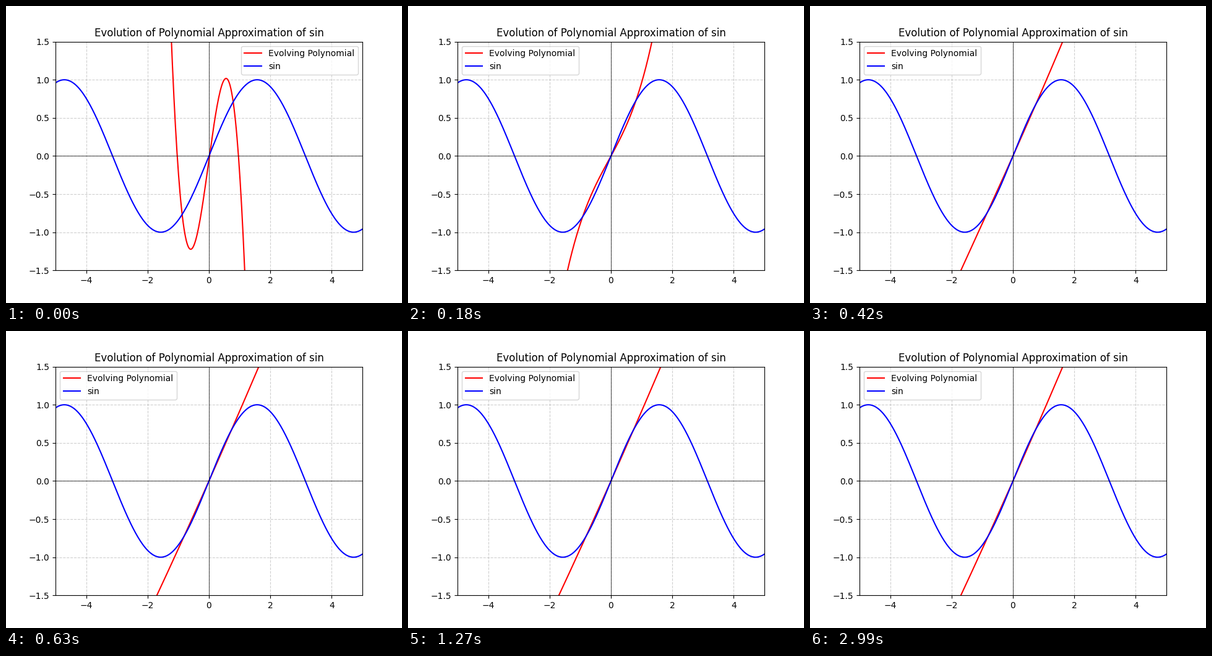
A matplotlib script that plays this animation: 640x480 px, repeating every 3150 ms.

```python
import numpy as np
import matplotlib.pyplot as plt
from matplotlib.animation import FuncAnimation

INTERVAL = 30
FRAMES = 105

# Cubic coefficients, constant term first
START = np.array([-0.05, 2.915, -0.16, -2.93])
SWING = np.array([-0.008, 0.298, 0.137, 0.939])
FINAL = np.array([0.0, 0.9045, 0.012, 0.0])
DECAY = np.array([0.6, 0.65, 0.6, 0.585])
SWING_STEP = 3


def coefficients(step):
    """Swing across first, then settle geometrically on the final fit."""
    if step < SWING_STEP:
        return START + (SWING - START) * step / SWING_STEP
    return FINAL + (SWING - FINAL) * DECAY ** (step - SWING_STEP)


def evaluate(step):
    return np.polynomial.polynomial.polyval(x, coefficients(step))


x = np.linspace(-5, 5, 400)

fig, ax = plt.subplots(figsize=(6.4, 4.8), dpi=100)
poly, = ax.plot(x, evaluate(0), color="red", label="Evolving Polynomial")
ax.plot(x, np.sin(x), color="blue", label="sin")
ax.axhline(0, color="black", linewidth=0.5)
ax.axvline(0, color="black", linewidth=0.5)
ax.set_xlim(-5, 5)
ax.set_ylim(-1.5, 1.5)
ax.set_title("Evolution of Polynomial Approximation of sin")
ax.grid(True, linestyle="--", alpha=0.6)
ax.legend(loc="best")


def update(step):
    poly.set_ydata(evaluate(step))
    return poly,


anim = FuncAnimation(fig, update, frames=FRAMES, interval=INTERVAL,
                     repeat=True, repeat_delay=0)
plt.show()
```
